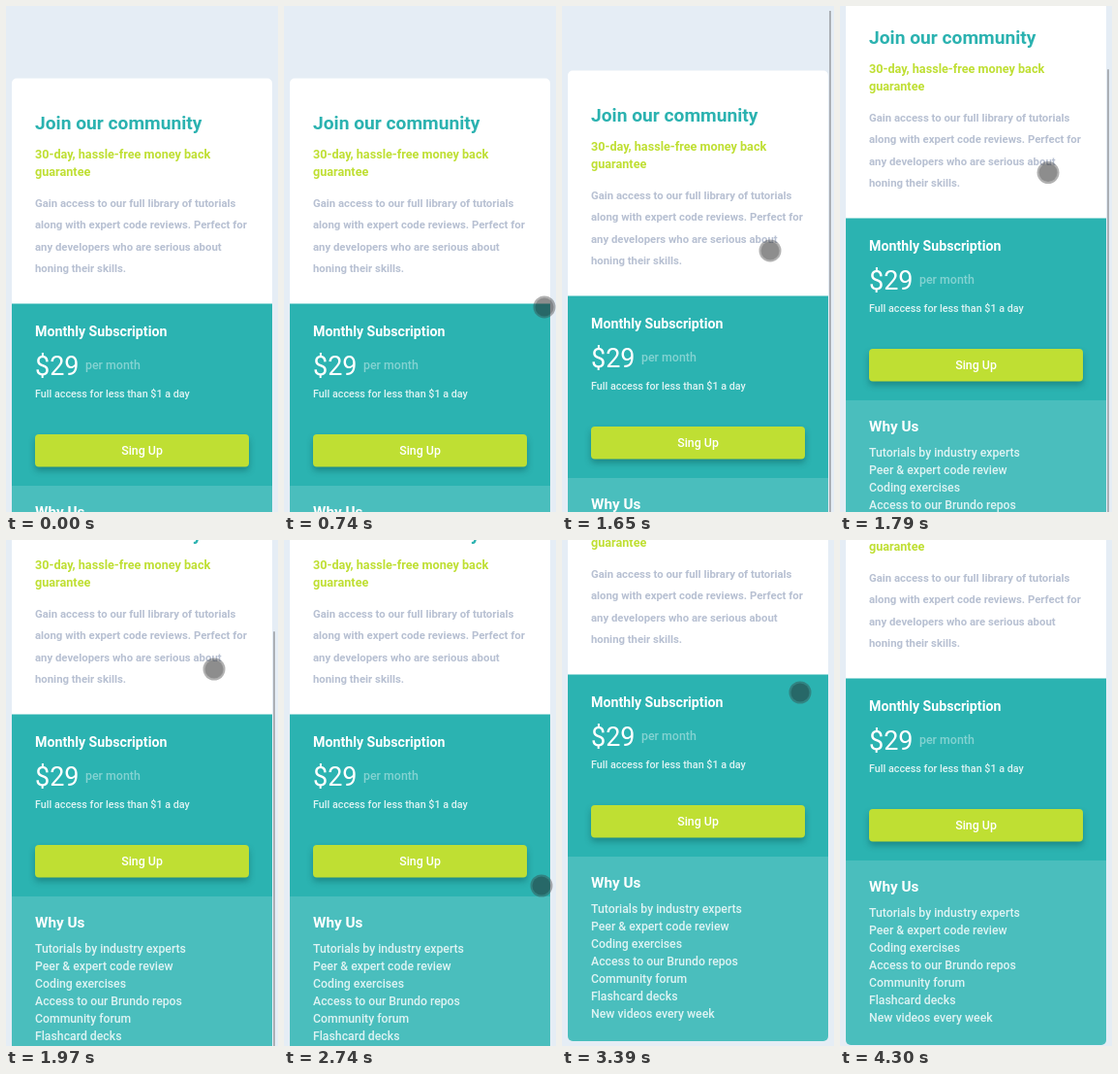
An HTML page with a canvas that plays this animation: 281 by 521 pixels, repeating every 4780 ms.

```html
<!DOCTYPE html>
<html lang="en">
<head>
<meta charset="utf-8">
<title>Subscription card</title>
<style>
  html, body { margin: 0; width: 100%; height: 100%; overflow: hidden; background: #e5edf5; }
  canvas { display: block; width: 281px; height: 521px; }
</style>
</head>
<body>
<canvas id="stage" width="281" height="521"></canvas>
<script>
const W = 281, H = 521, LOOP = 4780;
const MAX_SCROLL = 164, FIRST_STOP = 127, RELEASE = 3210;
const ctx = document.getElementById('stage').getContext('2d');

const ease = {
  both: u => u * u * (3 - 2 * u),
  in: u => u ** 1.5,
  out: u => 1 - (1 - u) ** 2,
  line: u => u
};

// Pointer path: time, x, y, easing used to arrive there
const path = [
  [0, 222, 536, 'line'],
  [30, 222, 536, 'line'],
  [470, 269, 311, 'out'],
  [740, 269, 310, 'line'],
  [960, 238, 178, 'both'],
  [1250, 215, 275, 'both'],
  [1570, 215, 275, 'line'],
  [1790, 215, 172, 'in'],
  [1970, 215, 133, 'out'],
  [2210, 215, 133, 'line'],
  [2530, 266, 372, 'both'],
  [2710, 266, 372, 'line'],
  [2740, 266, 356, 'line'],
  [3110, 246, 157, 'both'],
  [3420, 246, 157, 'line'],
  [3660, 236, 455, 'both'],
  [3870, 236, 455, 'line'],
  [4300, 214, 536, 'both'],
  [LOOP, 214, 536, 'line']
];

function pointerAt(t) {
  const i = Math.max(1, path.findIndex(key => key[0] > t));
  const [t0, x0, y0] = path[i - 1];
  const [t1, x1, y1, kind] = path[i];
  const u = ease[kind]((t - t0) / (t1 - t0));
  return { x: x0 + (x1 - x0) * u, y: y0 + (y1 - y0) * u };
}

function scrollAt(t, y) {
  if (t < 1570) return 0;
  if (t < 1970) return Math.max(0, 260 - y);
  if (t < 2740) return FIRST_STOP;
  if (t < RELEASE) {
    const raw = FIRST_STOP + Math.max(0, 356 - y);
    return Math.min(raw, MAX_SCROLL) + Math.max(0, raw - MAX_SCROLL) * 0.154;
  }
  return MAX_SCROLL + 25 * Math.exp(-(t - RELEASE) / 98);
}

function barAlpha(t) {
  if (t >= 1600 && t < 2480) return Math.min(1, (2480 - t) / 270);
  return t >= 2760 && t < RELEASE ? 1 : 0;
}

function box(x, y, w, h, color, radius = 0) {
  ctx.fillStyle = color;
  ctx.beginPath();
  ctx.roundRect(x, y, w, h, radius);
  ctx.fill();
}

function text(str, x, y, size, weight, color, align = 'left') {
  ctx.font = `${weight} ${size}px Roboto, sans-serif`;
  ctx.textAlign = align;
  ctx.fillStyle = color;
  ctx.fillText(str, x, y);
}

function lines(list, y, step, ...style) {
  list.forEach((str, i) => text(str, 30, y + i * step, ...style));
}

function drawIntro() {
  box(6, 74.5, 269, 233, '#ffffff', [5, 5, 0, 0]);
  text('Join our community', 30, 127, 19.2, 700, '#2bb2b0');
  lines(['30-day, hassle-free money back', 'guarantee'], 157, 18, 12.65, 700, '#bfdf33');
  lines([
    'Gain access to our full library of tutorials',
    'along with expert code reviews. Perfect for',
    'any developers who are serious about',
    'honing their skills.'
  ], 207, 22.3, 11.35, 700, '#b7c0d2');
}

function drawPrice() {
  box(6, 306.5, 269, 188, '#2bb3b1');
  text('Monthly Subscription', 30, 340, 14.2, 700, '#ffffff');
  text('$29', 30, 380, 27, 400, '#ffffff');
  text('per month', 82, 374, 12.4, 500, 'rgba(255,255,255,.42)');
  text('Full access for less than $1 a day', 30, 403, 10.75, 500, 'rgba(255,255,255,.85)');
  ctx.save();
  ctx.shadowColor = 'rgba(0,60,60,.35)';
  ctx.shadowBlur = 6;
  ctx.shadowOffsetY = 4;
  box(30, 441, 221, 33.5, '#bfdf33', 4);
  ctx.restore();
  text('Sing Up', 140.5, 461.5, 12.4, 500, '#ffffff', 'center');
}

function drawReasons() {
  box(6, 494, 269, 190, '#4abebd', [0, 0, 5, 5]);
  text('Why Us', 30, 526, 15.3, 700, '#ffffff');
  lines([
    'Tutorials by industry experts',
    'Peer & expert code review',
    'Coding exercises',
    'Access to our Brundo repos',
    'Community forum',
    'Flashcard decks',
    'New videos every week'
  ], 552, 18, 12.25, 500, 'rgba(255,255,255,.82)');
}

function drawPointer({ x, y }) {
  const disc = (r, color) => {
    ctx.fillStyle = color;
    ctx.beginPath();
    ctx.arc(x, y, r, 0, Math.PI * 2);
    ctx.fill();
  };
  disc(11.5, 'rgba(60,60,60,.4)');
  disc(9.5, 'rgba(0,0,0,.2)');
}

function draw(t) {
  const pointer = pointerAt(t);
  const scroll = scrollAt(t, pointer.y);
  box(0, 0, W, H, '#e5edf5');
  ctx.save();
  ctx.translate(0, -Math.round(scroll));
  drawIntro();
  drawPrice();
  drawReasons();
  ctx.restore();

  const alpha = barAlpha(t);
  if (alpha) {
    const top = Math.min(scroll, MAX_SCROLL) * 0.75 - 1;
    box(276, top, 2, H - top, `rgba(140,144,148,${0.65 * alpha})`);
  }
  drawPointer(pointer);
}

const start = performance.now();
function tick() {
  draw((performance.now() - start) % LOOP);
  requestAnimationFrame(tick);
}
tick();
</script>
</body>
</html>
```
